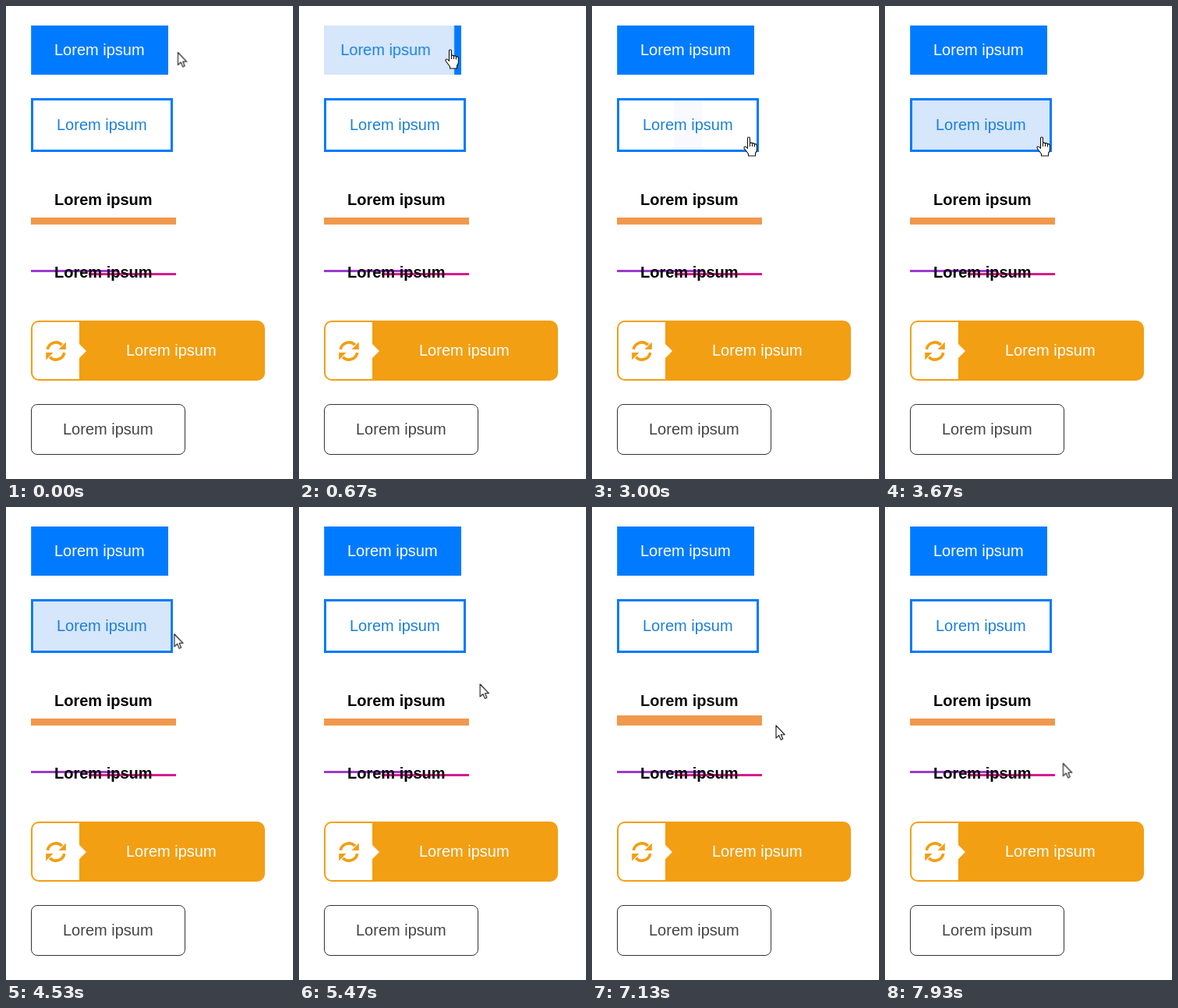
Write an HTML page that moves like this. It is 368x606 px and loops after 8000 ms.

```html
<!DOCTYPE html>
<html lang="en">
<head>
<meta charset="utf-8">
<title>Button hover effects</title>
<style>
  html, body { margin: 0; width: 100%; height: 100%; overflow: hidden; background: #fff; }
  body { position: relative; font: 20px/23px Arial, "Liberation Sans", sans-serif; }
  .btn { position: absolute; left: 32px; box-sizing: border-box; white-space: nowrap; padding: 20px 30px; }
  .btn > span { position: relative; }
  .bold { font-weight: bold; color: #000; }

  .push { top: 25px; width: 175.6px; height: 63px; padding: 0; overflow: hidden; background: #007bff; }
  .track { display: flex; width: 200%; animation: push 8s infinite; }
  .track span { width: 50%; box-sizing: border-box; padding: 20px 30px; }
  .light { background: #d6e6fb; color: #1b82dc; }
  .dark { background: #007bff; color: #fff; }

  .frame { top: 118px; border: 3px solid #007bff; color: #1b80d8; }
  .frame::before { content: ""; position: absolute; inset: 0; background: #d6e6fb; animation: spread 8s infinite; }

  .rise { top: 217px; animation: whiten 8s infinite; }
  .rise::before { content: ""; position: absolute; left: 0; right: 0; bottom: 0; height: 9px; background: #f0994d; animation: rise 8s infinite; }

  .lines { top: 310px; }
  .lines::before, .lines::after { content: ""; position: absolute; width: 60%; height: 3px; }
  .lines::before { left: 0; top: 28px; background: #9b3bd0; }
  .lines::after { right: 0; top: 32px; background: #d81b8c; }
  .lines > span { z-index: 1; }

  .badge { top: 403px; width: 300px; height: 77px; padding: 27px 0 0 122px; border-radius: 10px; background: #f29f13; color: #fff; }
  .badge svg { position: absolute; left: 0; top: 0; }

  .outline { top: 510px; padding: 20px 40px; border: 1px solid #333; border-radius: 8px; color: #444; }

  .cursor { position: absolute; left: 0; top: 0; overflow: visible; animation: move 8s linear infinite; }
  .cursor path { stroke: #111; stroke-width: 1.1; stroke-linejoin: round; fill: #fff; }
  .arrow { animation: arrow 8s step-end infinite; }
  .hand { animation: hand 8s step-end infinite; }

  @keyframes push {
    0%, 3.875% { transform: translateX(-50%); }
    10.125%, 21.6875% { transform: none; }
    27.9375%, 100% { transform: translateX(-50%); }
  }
  @keyframes spread {
    0%, 36.525% { transform: scaleX(0); opacity: 0; }
    42.775%, 56.5625% { transform: none; opacity: 1; }
    62.8125%, 100% { transform: scaleX(0); opacity: 0; }
  }
  @keyframes rise {
    0%, 71.5% { height: 9px; }
    77.75%, 84.875% { height: 63px; }
    91.125%, 100% { height: 9px; }
  }
  @keyframes whiten {
    0%, 71.5% { color: #000; }
    77.75%, 84.875% { color: #fff; }
    91.125%, 100% { color: #000; }
  }
  @keyframes move {
    0%, .8% { transform: translate(220.5px, 59.5px); }
    3.875% { transform: translate(208px, 58px); }
    8.375%, 20.5% { transform: translate(194px, 56px); }
    21.6875% { transform: translate(208.5px, 58px); }
    24.125% { transform: translate(226.5px, 61.5px); }
    29% { transform: translate(238px, 105px); }
    33.5% { transform: translate(230px, 155px); }
    36.525% { transform: translate(214px, 166px); }
    37.5%, 52% { transform: translate(201px, 168px); }
    56.5625% { transform: translate(215.5px, 162.5px); }
    60%, 63.4% { transform: translate(230px, 172px); }
    68% { transform: translate(234px, 225px); }
    71.5% { transform: translate(218px, 242px); }
    75%, 83.4% { transform: translate(201.5px, 245px); }
    84.875% { transform: translate(218.5px, 250px); }
    88.5% { transform: translate(236px, 275px); }
    93.4%, 95% { transform: translate(236px, 312px); }
    99%, 100% { transform: translate(228.5px, 328.5px); }
  }
  @keyframes arrow {
    0% { opacity: 1; } 3.875% { opacity: 0; }
    21.6875% { opacity: 1; } 36.525% { opacity: 0; }
    56.5625% { opacity: 1; } 71.5% { opacity: 0; }
    84.875%, 100% { opacity: 1; }
  }
  @keyframes hand {
    0% { opacity: 0; } 3.875% { opacity: 1; }
    21.6875% { opacity: 0; } 36.525% { opacity: 1; }
    56.5625% { opacity: 0; } 71.5% { opacity: 1; }
    84.875%, 100% { opacity: 0; }
  }
</style>
</head>
<body>
  <div class="btn push"><div class="track"><span class="light">Lorem ipsum</span><span class="dark">Lorem ipsum</span></div></div>
  <div class="btn frame"><span>Lorem ipsum</span></div>
  <div class="btn bold rise"><span>Lorem ipsum</span></div>
  <div class="btn bold lines"><span>Lorem ipsum</span></div>
  <div class="btn badge">
    <svg width="80" height="77">
      <path d="M62 2H10a8 8 0 0 0-8 8V67a8 8 0 0 0 8 8H62V48L71 39 62 30Z" fill="#fff"/>
      <g transform="translate(32 39)">
        <g id="sweep">
          <path d="M-10.8-2.2A11 11 0 0 1 7.8-7.8" fill="none" stroke="#f29f13" stroke-width="3.7"/>
          <path d="M12.8-11.5V-2H3.5Z" fill="#f29f13"/>
        </g>
        <use href="#sweep" transform="rotate(180)"/>
      </g>
    </svg>
    <span>Lorem ipsum</span>
  </div>
  <div class="btn outline"><span>Lorem ipsum</span></div>

  <svg class="cursor" width="1" height="1">
    <path class="arrow" d="M0 0V16.2L3.7 12.7 6.2 18.4 8.7 17.3 6.3 11.8H11.3Z"/>
    <g class="hand">
      <path d="M-1.5 1.5Q-1.5 0 0 0T1.5 1.5V7.5Q3-.3+6.8 4.5 8Q6 7 7.4 8.8 9-.1+8.4 10.4 10.5V16Q10.4 18.5 8.5 20.5V24H-.5V21.5L-5.8 14.5Q-6.6 12.5-4.8 12-3.6 11.8-1.5 14.5Z" style="display:none"/>
      <path d="M-1.5 1.5Q-1.5 0 0 0T1.5 1.5V7.6Q3 6.4 4.5 8 6 7 7.4 8.8 9.2 8.2 10.4 10.5V16Q10.4 18.5 8.5 20.5V24H-.5V21.5L-5.8 14.5Q-6.6 12.5-4.8 12-3.6 11.8-1.5 14.5Z"/>
      <path d="M1.5 7.6V12M4.5 8V12M7.4 8.8V12.5" style="fill:none"/>
    </g>
  </svg>
</body>
</html>
```
